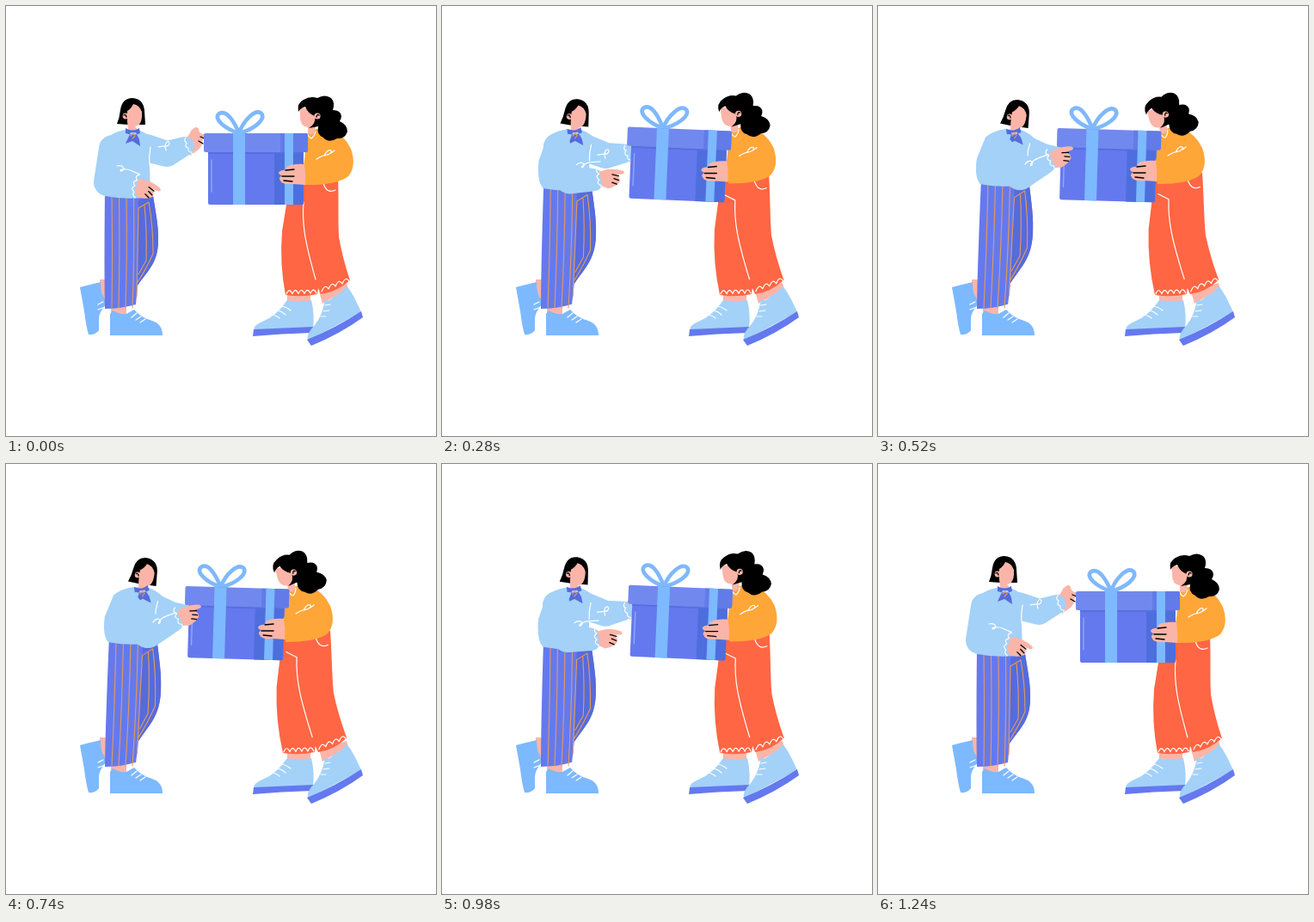
An HTML page that plays this animation: 500x500 px, repeating every 1.36 s.

```html
<!DOCTYPE html>
<html lang="en">
<head>
<meta charset="utf-8">
<title>Handing over a gift</title>
<style>
  html, body { margin: 0; width: 100%; height: 100%; overflow: hidden; background: #fff; }
  svg { display: block; width: 100%; height: 100%; }
  .sky { fill: #a3d1f8; }
  .skin { fill: #fbb5a8; }
  .indigo { fill: #6479ee; }
  .navy { fill: #566bdc; }
  .amber { fill: #ffa638; }
  .coral { fill: #ff6644; }
  .ribbon { fill: #7db9ff; }
  .line, .ink, .stripe, .bow { fill: none; stroke-linecap: round; stroke-linejoin: round; }
  .line { stroke: #fff; stroke-width: 1.2; }
  .ink { stroke: #000; stroke-width: 1.3; }
  .stripe { stroke: #e59c58; stroke-width: 1.1; }
  .bow { stroke: #7fb8fd; stroke-width: 4.6; }
</style>
</head>
<body>
<!-- paths with data-bend use absolute M, L, Q, C only, so each point can be shifted -->
<svg viewBox="0 0 500 500">
  <!-- left person: shoes and trousers -->
  <path class="skin" d="M109 318H117L116 343L110 340Z M122 349H140V360H122Z"/>
  <path class="ribbon" d="M86 327Q97 324 110 321Q110 334 114 339L117 346Q108 356 108 364V377Q104 383 96 382Q93 372 91 355Z"/>
  <path class="ribbon" d="M121 358L124 354Q132 359 140 358L149 353Q158 363 170 366Q182 370 182 383H121Z"/>
  <path class="line" d="M107 347L113 344M107 353L115 350M146 362L152 357M151 365L157 361M156 368L162 364"/>
  <path class="indigo" data-bend="leftLegs" d="M115 214L170 214C173 235 177 252 177 268C178 298 166 306 153 325L151 347Q134 352 115 352Q114 310 115 214Z"/>
  <path class="navy" data-bend="leftLegs" d="M154 226L170 214C173 235 177 252 177 268C178 298 166 306 153 325Z"/>
  <path class="stripe" data-bend="leftLegs" id="stripes"/>
  <path class="stripe" data-bend="leftLegs" d="M152 338L154 235L166 228M161 232Q164 262 163 296L154 312M166 228Q171 255 171 288Q163 306 153 321"/>

  <!-- left person: far arm and torso -->
  <g id="farHand">
    <path class="skin" d="M206 156Q213 152 215 145Q222 138 224 143Q224 148 229 149L237 150Q237 153 229 155Q228 165 221 169L214 174Z"/>
    <path class="ink" d="M226 152L231 154M224 157L229 160"/>
  </g>
  <path class="sky" id="farArm"/>
  <path class="line" id="farTrim" d="M209 153q-3 4 1 6q-3 5 2 6q-1 5 4 5q0 4 3 4M186 168C183 158 190 155 190 160C189 165 183 162 177 164"/>
  <path class="sky" data-bend="leftTorso" d="M138 144Q123 147 116 155L108 185Q107 212 115 221Q142 226 168 222L167 185L172 156Q164 148 156 145Z"/>
  <path class="line" data-bend="leftTorso" d="M168 164Q166 175 167 185"/>

  <!-- left person: head and scarf -->
  <g id="leftHead">
    <path d="M129 137Q132 130 133 121Q135 107 147 107Q160 108 161 122L162 138H142Z"/>
    <path class="skin" d="M141 134V122Q145 120 148 114Q155 115 158 123Q159 139 150 140L154 145Q148 148 142 144Z"/>
    <circle class="skin" cx="139" cy="128" r="3.4"/>
    <path class="ink" d="M137 127Q139 125 140 129"/>
  </g>
  <g id="scarf">
    <path class="navy" d="M-8 -1Q0 4 8 -1L9 5Q2 8 -8 5Z M-2 4L-8 17L0 14L9 20L8 12L4 4Z"/>
    <path class="stripe" d="M-2 8L1 5L3 8L0 11"/>
  </g>

  <!-- right person: shoes and trousers -->
  <path class="skin" d="M327 333H354V344H327Z M364 332L396 322L398 329L368 346Z"/>
  <path class="sky" d="M288 377Q288 371 298 367Q314 361 327 342Q341 345 355 342Q359 358 357 376Z"/>
  <path class="indigo" d="M288 376L357 373L356 380Q320 381 287 384Z"/>
  <path class="sky" d="M351 389Q349 381 359 371Q368 360 371 341Q375 345 381 338Q390 334 396 326Q402 331 413 356Z"/>
  <path class="indigo" d="M350 388Q384 374 413 355L415 362Q389 381 355 395Z"/>
  <path class="line" d="M321 349Q326 350 331 354M316 354Q321 355 325 359M309 359Q315 360 318 363M371 348L377 347M369 355L376 354M366 361L372 361"/>
  <path class="coral" data-bend="rightLegs" d="M331 200L386 198C387 225 386 245 387 268Q391 292 400 319Q384 333 366 335L363 328L362 335Q344 339 325 336Q318 300 321 262Z"/>
  <path class="line" data-bend="rightLegs" d="M334 222L346 228C344 252 347 272 360 318M369 206Q373 219 383 214"/>
  <path class="line" data-bend="rightLegs" id="hems"/>

  <!-- right person: torso and head -->
  <path class="amber" id="rightTorso" d="M350 148Q360 141 376 143Q393 149 401 166Q408 186 398 198Q386 208 349 208L346 190Z"/>
  <g id="rightHead">
    <path class="skin" d="M342 119L360 118V140L359 147Q354 152 351 147V141Q342 140 342 129Z"/>
    <path d="M340 123Q338 113 346 109Q354 104 362 107Q371 102 378 107Q383 112 380 121Q389 121 390 128Q390 131 388 134Q397 138 397 146Q394 155 385 154Q375 160 369 153Q361 150 363 140L352 142Q361 137 359 128Q351 125 348 117Q342 119 340 123Z"/>
    <circle class="skin" cx="362" cy="128" r="3.6"/>
    <path class="ink" d="M361 129Q362 125 364 127"/>
    <path class="line" d="M350 147Q352 153 355 154Q359 151 360 146"/>
  </g>

  <!-- gift box, origin at the lid's top left corner -->
  <g id="box">
    <path class="bow" d="M41 0C25 -5 10 -17 18 -23C27 -28 36 -12 41 0C46 -15 60 -29 67 -23C73 -16 57 -4 41 0Z"/>
    <rect class="indigo" x="5" y="18" width="111" height="65" rx="2"/>
    <path d="M82 20H116V81Q116 83 114 83H82Z" fill="#4e6edd"/>
    <path d="M5 22H116V24H5Z" fill="#566ee0"/>
    <rect width="121" height="22" rx="2" fill="#7189ee"/>
    <path d="M89 0H119Q121 0 121 2V20Q121 22 119 22H89Z" fill="#627be8"/>
    <path class="ribbon" d="M34 0H48V83H34Z M94 0H104V83H94Z"/>
    <path d="M9 31V68" stroke="#8fa9f8" stroke-width="1.4" stroke-linecap="round"/>
  </g>

  <!-- right person: sleeve and hand over the box -->
  <g id="rightArm">
    <path class="amber" d="M351 172Q349 180 346 184Q349 196 347 208Q370 208 387 204L380 172Z"/>
    <path class="skin" d="M347 184Q334 183 326 187Q324 190 328 190Q317 191 317 194Q318 197 321 197Q316 200 319 203Q320 208 334 207L348 208Q349 196 347 184Z"/>
    <path class="ink" d="M325 191L335 190M321 198L335 198M323 203L333 204"/>
    <path class="line" d="M361 178Q369 173 374 173Q379 171 378 168Q374 166 370 174Q376 173 382 168"/>
  </g>

  <!-- left person: near arm, hand origin at the wrist -->
  <path class="sky" id="nearArm"/>
  <g id="nearHand">
    <path class="skin" d="M-1 -8L8 -9Q19 -8 26 -4Q29 -1 25 0L17 -1Q22 3 20 8Q14 13 5 13L-1 9Z"/>
    <path class="ink" d="M13 -2L20 1M14 3L19 6M11 7L16 10"/>
    <path class="line" d="M-1 -13q-6 3 -1 7q-6 3 -1 7q-5 4 1 7q-2 4 3 6"/>
  </g>
  <path class="line" id="nearFold" d="M0 0C7 -4 11 1 7 4C2 5 9 -1 17 0L28 1"/>
</svg>
<script>
  const LOOP = 1360, STEP = 20, TRAVEL = 520, RETURN = 720;

  // Full-travel shift of a body part at its lower and upper height; linear in between
  const BENDS = {
    leftLegs: { low: 350, high: 220, from: [0, 0], to: [5, -14] },
    leftTorso: { low: 222, high: 145, from: [4, -14], to: [10, -1] },
    rightLegs: { low: 336, high: 205, from: [-3, 0], to: [-9, -4] },
  };

  const $ = id => document.getElementById(id);
  const clamp = x => Math.min(1, Math.max(0, x));
  const ease = u => 0.5 - 0.5 * Math.cos(Math.PI * u ** 0.83);
  const range = n => [...Array(n).keys()];

  function place(id, x, y, angle = 0, pivotX = 0, pivotY = 0) {
    $(id).setAttribute('transform', `translate(${x} ${y}) rotate(${angle} ${pivotX} ${pivotY})`);
  }

  function bend(path, { low, high, from, to }, p) {
    return path.replace(/(-?[\d.]+)[ ,](-?[\d.]+)/g, (_, x, y) => {
      const k = clamp((low - y) / (low - high));
      const [dx, dy] = from.map((f, i) => p * (f + (to[i] - f) * k));
      return `${+x + dx} ${+y + dy}`;
    });
  }

  // Hull of two circles [x, y, radius]
  function capsule([ax, ay, ar], [bx, by, br]) {
    const dir = Math.atan2(by - ay, bx - ax);
    const open = Math.acos((ar - br) / Math.hypot(bx - ax, by - ay));
    const rim = (x, y, r, side) => `${x + r * Math.cos(dir + side * open)} ${y + r * Math.sin(dir + side * open)}`;
    return `M${rim(ax, ay, ar, 1)}A${ar} ${ar} 0 ${+(ar >= br)} 1 ${rim(ax, ay, ar, -1)}` +
      `L${rim(bx, by, br, -1)}A${br} ${br} 0 ${+(br > ar)} 1 ${rim(bx, by, br, 1)}Z`;
  }

  function sleeve(id, shoulder, elbow, wrist) {
    $(id).setAttribute('d', capsule(shoulder, elbow) + capsule(elbow, wrist));
  }

  function scallops(x, y, dx, dy, count) {
    return `M${x} ${y}` + range(count).map(i =>
      `Q${x + dx * (i + 0.5)} ${y + dy * (i + 0.5) - 8} ${x + dx * (i + 1)} ${y + dy * (i + 1)}`).join('');
  }

  $('stripes').setAttribute('d', range(4).map(i => {
    const x = 123 + 8.5 * i;
    return `M${x} 222Q${x + 1} 290 ${x - i * 0.5} 351`;
  }).join(''));
  $('hems').setAttribute('d', scallops(326, 335, 7, -0.2, 5) + scallops(367, 332, 8, -3, 4));

  const bent = [...document.querySelectorAll('[data-bend]')].map(node =>
    ({ node, path: node.getAttribute('d'), rule: BENDS[node.dataset.bend] }));

  // p = 0: gift held by the right person, p = 1: handed over
  function pose(p) {
    const arc = 4 * p * (1 - p);
    for (const { node, path, rule } of bent) node.setAttribute('d', bend(path, rule, p));

    place('box', 230 - 21.5 * p, 148 - 6 * p - 4 * arc, 1.7 * p + 1.5 * arc);
    place('rightTorso', -24 * p, -p - arc);
    place('rightHead', -23 * p, -p - 1.5 * arc, -14 * p ** 1.5, 356, 146);
    place('rightArm', -24 * p, -4 * p - arc);

    place('leftHead', 12 * p, 2 * p, 8 * p, 148, 143);
    place('scarf', 147 + 10 * p, 143, -8 * p);
    place('farHand', 5 * arc, 12 * p);
    place('farTrim', 6 * p, 14 * p);
    sleeve('farArm', [163 + 5 * p, 165, 16], [187 + 5 * p, 172 + 3 * p, 15], [208 + 6 * p, 163 + 13 * p, 11]);

    const turn = 15 - 40 * p, angle = turn * Math.PI / 180;
    const x = 153 + 50 * p, y = 209 - 31 * p ** 3;
    place('nearHand', x, y, turn);
    place('nearFold', 129 + 42 * p, 186 - 2 * p, 18 - 43 * p);
    sleeve('nearArm', [124 + 15 * p, 166 - 3 * p, 16], [118 + 47 * p, 205 - 9 * p * p, 16 + 2 * p],
      [x - 10 * Math.cos(angle), y - 10 * Math.sin(angle), 13]);
  }

  function draw(now) {
    const t = Math.floor(now % LOOP / STEP) * STEP;
    pose(ease(t < RETURN ? clamp(t / TRAVEL) : 1 - clamp((t - RETURN) / TRAVEL)));
  }

  const start = performance.now();
  function tick() {
    draw(performance.now() - start);
    requestAnimationFrame(tick);
  }
  tick();
</script>
</body>
</html>
```
